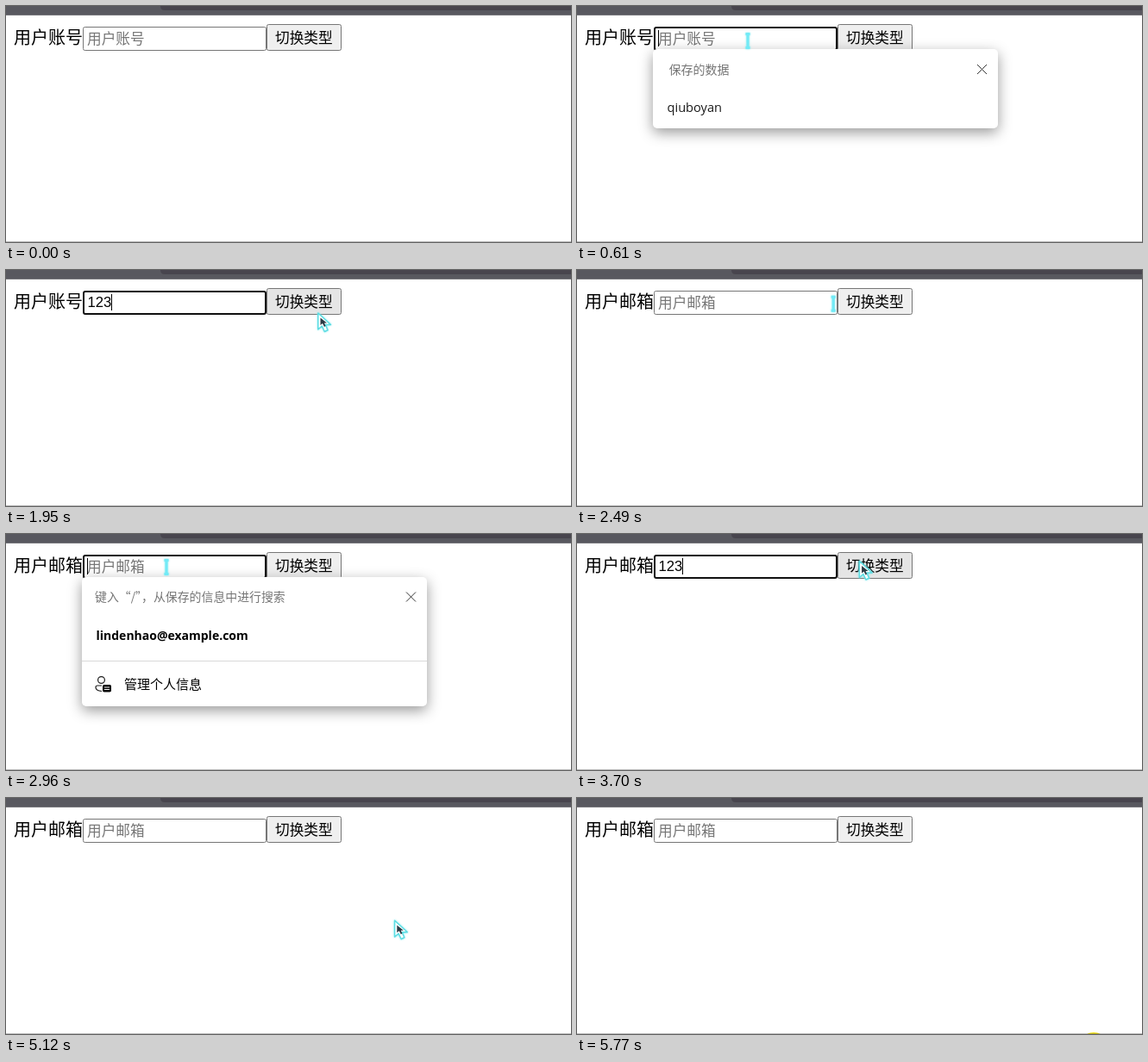
These frames come from a looping animation (655x274 px, 5830 ms). An HTML page:

```html
<!DOCTYPE html>
<html lang="zh-CN">
<head>
<meta charset="utf-8">
<title>切换类型</title>
<style>
  html, body { margin: 0; width: 100%; height: 100%; overflow: hidden; background: #fff; }
  svg { display: block; width: 655px; height: 274px; }
  text { font-family: "Noto Sans CJK SC", "Noto Sans CJK", sans-serif; }
  .field { font-size: 16.67px; }
  .latin { font-family: "Liberation Sans", Arial, sans-serif; }
  .hint, .head { fill: #757575; }
  .item { font-family: "Open Sans", "Noto Sans", sans-serif; font-size: 14px; }
  .bold { font-weight: 700; }
  .popup { transform-box: fill-box; transform-origin: center; filter: drop-shadow(0 5px 8px rgba(0, 0, 0, .4)); }
  .line { fill: none; stroke: #1b1b1b; stroke-width: 1.2; }
  .close { fill: none; stroke: #333; }
  #click { mix-blend-mode: multiply; }
  #arrow, #beam { filter: drop-shadow(0 0 1px #7beaf0); }
</style>
</head>
<body>
<svg viewBox="0 0 655 274">
  <rect width="655" height="274" fill="#fff"/>
  <rect width="655" height="11" fill="#58585f"/>
  <path d="M179 0H655V5H184Q179 5 179 0Z" fill="#48454e"/>
  <rect y="10" width="655" height="1" fill="#77777c"/>
  <rect y="273" width="655" height="1" fill="#c4c4c4"/>

  <text id="label" x="9" y="44" font-size="20"></text>
  <rect id="box" rx="2" fill="#fff"/>
  <text id="hint" class="field hint" x="94" y="43.5"></text>
  <text id="value" class="field latin" x="94.5" y="43"></text>
  <rect id="caret" y="28" width="1" height="19"/>
  <rect id="button" x="302.5" y="21.5" width="86" height="30" rx="2" stroke="#767676"/>
  <text class="field" x="312" y="43">切换类型</text>

  <g id="saved" class="popup">
    <rect x="88" y="50" width="400" height="92" rx="5" fill="#fff"/>
    <text class="head" x="106.5" y="78.5" font-size="14">保存的数据</text>
    <path class="close" d="M464 68l11 11m0-11l-11 11"/>
    <text class="item" x="104.5" y="123" style="font-size: 14.6px" fill="#1b1b1b">qiuboyan</text>
  </g>

  <g id="mails" class="popup">
    <rect x="88" y="50" width="400" height="150" rx="5" fill="#fff"/>
    <text class="head" x="103" y="78" font-size="13.9">键入“/”，从保存的信息中进行搜索</text>
    <path class="close" d="M464 67.5l11 11m0-11l-11 11"/>
    <text class="item bold" x="104.5" y="123">lindenhao@example.com</text>
    <rect x="88" y="147" width="400" height="1" fill="#d9d9d9"/>
    <circle class="line" cx="110.5" cy="169.5" r="3.9"/>
    <path class="line" d="M111 176H106Q104 176 104 178Q104 182 111 182.5"/>
    <rect x="112" y="175" width="10" height="8.5" rx="1.8"/>
    <path d="M114 178h6m-6 2.5h6" stroke="#fff"/>
    <text x="137" y="180" font-size="15">管理个人信息</text>
  </g>

  <g id="cursor">
    <g id="arrow">
      <path d="M.8 0V19L5.3 15L8.3 21.5L12 19.8L9.3 13.5H15.5Z" fill="#fff" stroke="#5cdce2" stroke-width="1.5" stroke-linejoin="round"/>
      <path d="M3.5 5.5V14L6 12L8 16L9.5 15L8 11.5H11Z" fill="#2b3a44"/>
    </g>
    <path id="beam" d="M-2.5 -8.5H2.5M-2.5 7.5H2.5M0 -8.5V7.5" fill="none" stroke="#72eaf6" stroke-width="3"/>
    <circle id="click" r="16" fill="#f8e82c"/>
  </g>
</svg>
<script>
const LOOP = 5830, STEP = 67.1;
const ENTER = 125, HOLD = 100, KEY_GAP = 200;

// pointer moves: begin, end, target x, y
const moves = [
  [130, 420, 198, 41],
  [1540, 1950, 361, 50],
  [2080, 2200, 351, 40],
  [2340, 2740, 186, 39],
  [3370, 3760, 336, 31],
  [4700, 5600, 599, 288]
];
const clicks = [470, 2200, 2750, 3760, 4110, 4300, 4530, 5760];
const typing = [1075, 3090];

const el = {};
document.querySelectorAll('[id]').forEach(n => el[n.id] = n);

const clamp = v => Math.max(0, Math.min(1, v));
const smooth = v => v * v * (3 - 2 * v);
const show = (node, on) => node.style.display = on ? '' : 'none';
const set = (node, attrs) => { for (const k in attrs) node.setAttribute(k, attrs[k]); };
const past = (list, t) => list.filter(v => t >= v).length;

function pointer(t) {
  let x = 338, y = 165;
  for (const [begin, end, tx, ty] of moves) {
    const f = smooth(clamp((t - begin) / (end - begin)));
    x += (tx - x) * f;
    y += (ty - y) * f;
  }
  return [x, y];
}

const overInput = ([x, y]) => x >= 89 && x < 302 && y >= 23 && y < 52;
const overButton = ([x, y]) => x >= 302 && x < 389 && y >= 21 && y < 53;

// clicks act on whatever lies under the pointer
const focuses = clicks.filter(c => overInput(pointer(c)));
const toggles = clicks.filter(c => overButton(pointer(c))).map(c => c + HOLD);

function popup(node, t, i) {
  const a = clamp((t - focuses[i] - 60) / 80);
  const c = clamp((t - typing[i] - 63) / 190);
  const alpha = a * (1 - c);
  show(node, alpha > 0);
  node.style.opacity = alpha;
  node.style.transform = `scale(${(0.96 + 0.04 * a) * (1 - 0.06 * c)})`;
}

function draw(ms) {
  // the screen refreshes about 15 times a second
  const t = Math.floor((ms + 5) / STEP) * STEP + 10;
  const spot = pointer(t), [x, y] = spot;
  const name = past(toggles, t) % 2 ? '用户邮箱' : '用户账号';
  const session = past(focuses, t) - 1;
  const focused = session >= 0 && !toggles.some(v => v > focuses[session] && v <= t);
  const typed = focused ? Math.floor(Math.max(0, Math.min(3, (t - typing[session]) / KEY_GAP + 1))) : 0;
  const pressed = clicks.some(c => t >= c && t < c + HOLD);

  el.label.textContent = name;
  el.hint.textContent = typed ? '' : name;
  el.value.textContent = '123'.slice(0, typed);
  set(el.box, focused
    ? { x: 90, y: 25, width: 211, height: 26, stroke: '#101010', 'stroke-width': 2 }
    : { x: 89.5, y: 24.5, width: 212, height: 27, stroke: '#767676', 'stroke-width': 1 });
  show(el.caret, focused);
  el.caret.setAttribute('x', 94 + Math.round(typed * 9.27));
  const hover = t > ENTER && overButton(spot);
  el.button.setAttribute('fill', !hover ? '#efefef' : pressed ? '#f5f5f5' : '#e5e5e5');

  popup(el.saved, t, 0);
  popup(el.mails, t, 1);

  const beam = overInput(spot) && !typed;
  show(el.cursor, t > ENTER);
  el.cursor.setAttribute('transform', `translate(${x.toFixed(1)} ${y.toFixed(1)})`);
  show(el.beam, beam);
  show(el.arrow, !beam);
  show(el.click, pressed);
}

let start;
function tick(now) {
  start ??= now;
  draw((now - start) % LOOP);
  requestAnimationFrame(tick);
}
draw(0);
requestAnimationFrame(tick);
</script>
</body>
</html>
```
